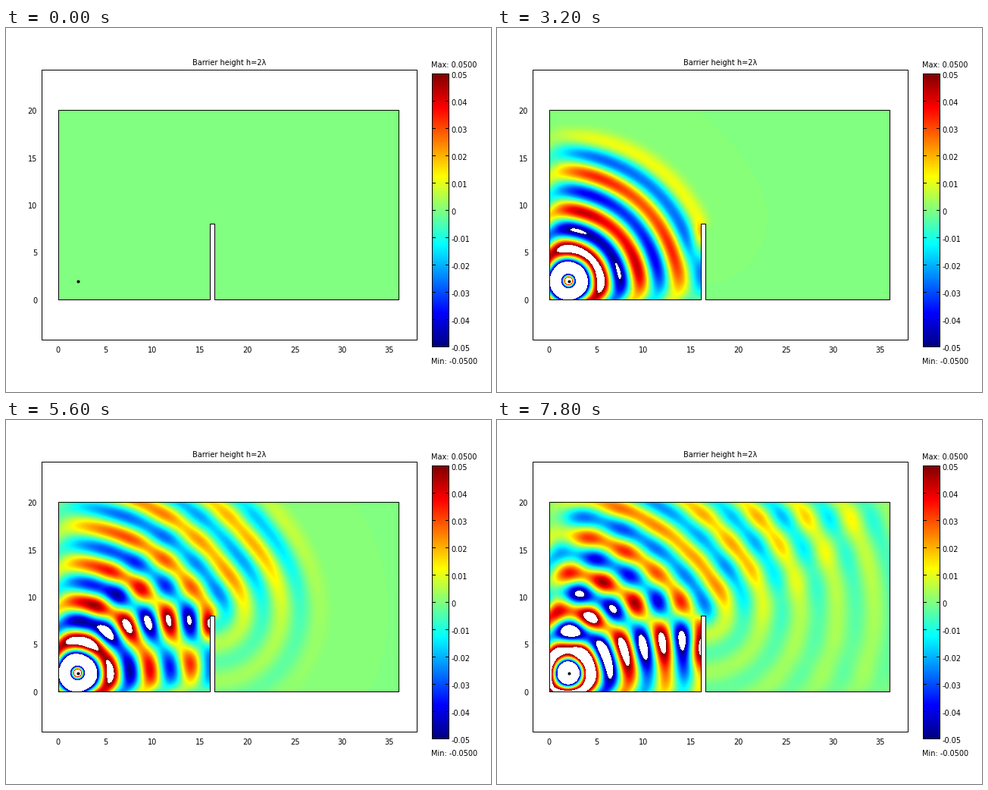
These frames come from a looping animation (640 by 480 pixels, 8 s). A matplotlib script:

```python
import math

import numpy as np
import matplotlib.pyplot as plt
from matplotlib.animation import FuncAnimation

FRAMES, INTERVAL = 40, 200
W, H = 640, 480

# Wave model: one grid node per pixel, one time unit per frame
NX, NY, CELL = 450, 251, 0.08
STEPS = 32
DT = 1 / STEPS
OMEGA = math.pi / 2
SPEED = 0.982
VISCOSITY = 0.012
STRENGTH = 0.69
LEAD = 6
LIMIT = 0.05
SOURCE = (25, 25)
WALL = (slice(0, 100), slice(201, 206))

# Stage positions in pixels
LEFT, TOP, RIGHT, BOTTOM = 69, 108, 518, 358
UNIT = 12.5


def jet(v):
    """Map values in 0..1 to the blue-green-red scale."""
    bands = [1.5 - np.abs(4 * v - c) for c in (3, 2, 1)]
    return np.clip(np.stack(bands, axis=-1), 0, 1)


def paint(u):
    """Colour the field; values out of range stay white."""
    u = np.where(np.abs(u) < 1e-7, 0, u)
    level = np.ceil((u / LIMIT + 1) * 64) / 128
    rgb = jet(np.clip(level, 0, 1))
    rgb[np.abs(u) > LIMIT] = 1
    rgb[WALL] = 1
    return (rgb[::-1] * 255 + 0.5).astype(np.uint8)


def drive(t):
    """Smoothly switched-on cosine with a faint forerunner."""
    if t < -1:
        return 2e-4
    swell = 0.5 * (1 + math.erf((t - 0.55) / 1.7))
    return swell * math.cos(OMEGA * t)


def simulate():
    """Finite differences: rigid barrier, absorbing outer edges."""
    solid = np.zeros((NY, NX), bool)
    solid[WALL] = True
    stiff = (SPEED / CELL) ** 2
    open_x = ~(solid[:, 1:] | solid[:, :-1]) * stiff
    open_y = ~(solid[1:] | solid[:-1]) * stiff

    loss = np.zeros((NY, NX))
    for edge in (np.s_[0], np.s_[-1], np.s_[:, 0], np.s_[:, -1]):
        loss[edge] += SPEED / CELL
    half = loss * DT / 2
    keep, scale = 1 - half, 1 / (1 + half)

    u = np.zeros((NY, NX))
    old = np.zeros((NY, NX))
    shots = [paint(u)]
    for n in range(-LEAD * STEPS, (FRAMES - 1) * STEPS):
        w = u + (u - old) * (VISCOSITY / DT)
        gx = (w[:, 1:] - w[:, :-1]) * open_x
        gy = (w[1:] - w[:-1]) * open_y
        acc = np.zeros((NY, NX))
        acc[:, :-1] += gx
        acc[:, 1:] -= gx
        acc[:-1] += gy
        acc[1:] -= gy
        acc[SOURCE] += STRENGTH * drive(n * DT) / CELL**2
        old, u = u, (2 * u - keep * old + DT**2 * acc) * scale
        if n + 1 > 0 and (n + 1) % STEPS == 0:
            shots.append(paint(u))
    return shots


fig = plt.figure(figsize=(W / 100, H / 100), dpi=100, facecolor="white")
ax = fig.add_axes([0, 0, 1, 1])
ax.axis("off")


def label(x, y, text, ha="left"):
    ax.text(x, y + 5, text, ha=ha, va="baseline", fontsize=7.05,
            family="DejaVu Sans", color="black")


def line(points):
    """One-pixel line through pixel centres."""
    xs, ys = zip(*points)
    ax.plot([x + 0.5 for x in xs], [y + 0.5 for y in ys], color="black",
            lw=0.72, solid_joinstyle="miter", solid_capstyle="projecting",
            snap=False, zorder=3)


def box(x0, y0, x1, y1):
    line([(x0, y0), (x1, y0), (x1, y1), (x0, y1), (x0, y0)])


shots = simulate()
field = ax.imshow(shots[0], extent=(LEFT, LEFT + NX, TOP + NY, TOP),
                  interpolation="nearest", aspect="auto", zorder=1)

# Plot frame, domain outline with barrier, source
box(47, 55, 542, 411)
line([(LEFT, BOTTOM), (LEFT, TOP), (RIGHT, TOP), (RIGHT, BOTTOM),
      (275, BOTTOM), (275, 258), (269, 258), (269, BOTTOM), (LEFT, BOTTOM)])
ax.plot([94.5], [333.5], "o", color="black", ms=2.9, mew=0, snap=False,
        zorder=4)

label(294.5, 44, "Barrier height h=2λ", "center")
for v in range(0, 40, 5):
    label(LEFT - 0.5 + v * UNIT, 423, str(v), "center")
for v in range(0, 25, 5):
    label(41, BOTTOM - v * UNIT, str(v), "right")

# Colour bar
scale_rgb = jet(np.linspace(1, 0, 361))[:, None]
ax.imshow(scale_rgb, extent=(562, 585, 421, 60),
          interpolation="nearest", aspect="auto", zorder=1)
box(562, 60, 584, 420)
for i in range(11):
    y = 60 + 36 * i
    line([(562, y), (566, y)])
    line([(580, y), (584, y)])
    label(587.5, y + 1.5, "0" if i == 5 else f"{0.05 - i / 100:.2f}")
label(561, 47, "Max: 0.0500")
label(561, 438, "Min: -0.0500")

ax.set_xlim(0, W)
ax.set_ylim(H, 0)


def update(i):
    field.set_data(shots[i])
    return [field]


anim = FuncAnimation(fig, update, frames=FRAMES, interval=INTERVAL,
                     repeat=True, repeat_delay=0, blit=False)
plt.show()
```
